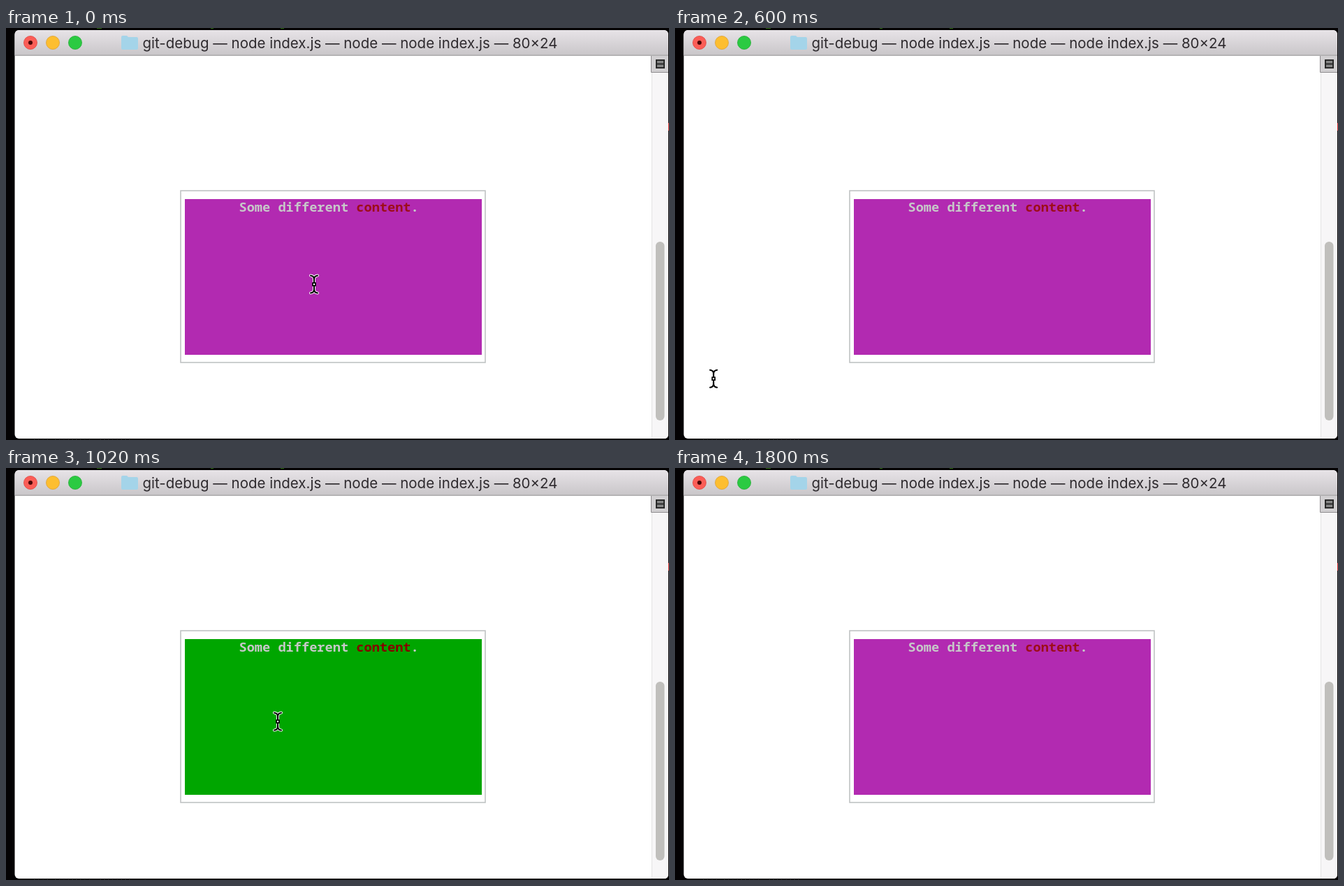
Animation, 949 px wide and 590 px high, one loop 1.86 s. Source, as an HTML page:

```html
<!DOCTYPE html>
<html lang="en">
<head>
<meta charset="utf-8">
<title>Terminal hover panel</title>
<style>
  html, body { margin: 0; width: 100%; height: 100%; overflow: hidden; background: #000; }
  svg { display: block; }
  .title { font: 20.5px Inter, Roboto, sans-serif; fill: #2e2a2e; text-anchor: middle; }
  .mono { font: 600 18.65px "Noto Sans Mono", "DejaVu Sans Mono", monospace; fill: #c7c8c9; white-space: pre; }
  .beam { fill: none; stroke-linecap: round; }
</style>
</head>
<body>
<svg width="949" height="590" viewBox="0 0 949 590">
  <defs>
    <linearGradient id="bar" x2="0" y2="1">
      <stop stop-color="#e7e3e7"/>
      <stop offset="1" stop-color="#c9c6c9"/>
    </linearGradient>
    <path id="beam" d="M-5-12.5Q0-12 0-7Q0-12 5-12.5M0-7V7M-5 12.5Q0 12 0 7Q0 12 5 12.5"/>
  </defs>

  <!-- desktop showing around the window -->
  <rect width="949" height="590" fill="#040203"/>
  <path d="M130 .5h7M293 .5h4M393 .5h5" stroke="#2c6a10"/>
  <path d="M40 589.5h22M70 589.5h52M134 589.5h44M198 589.5h4" stroke="#333" stroke-dasharray="2 4"/>

  <!-- window -->
  <rect x="12.5" y="3" width="935.5" height="585" rx="6" fill="#fff"/>
  <path d="M12.5 39V10q0-7 7-7H941q7 0 7 7V39z" fill="url(#bar)"/>
  <path d="M12.5 39.200H948" stroke="#8f8d8f"/>
  <path d="M948 136v11" stroke="#d02b2b" stroke-width="2"/>
  <circle cx="35" cy="21" r="9.500" fill="#fb5d57" stroke="#df4744" stroke-width=".8"/>
  <circle cx="35" cy="21" r="3" fill="#4a0505"/>
  <circle cx="67" cy="21" r="9.500" fill="#fdbe30" stroke="#dea032" stroke-width=".8"/>
  <circle cx="99" cy="21" r="9.500" fill="#2bca42" stroke="#24ad35" stroke-width=".8"/>
  <path d="M165 13q0-2 2-2h6l2 2h12q2 0 2 2V29q0 2-2 2H167q-2 0-2-2z" fill="#a4d4e9"/>
  <text class="title" x="492.5" y="28.500">git-debug — node index.js — node — node index.js — 80×24</text>

  <!-- scroll bar -->
  <path d="M924 64H948V582q0 6-6 6H924z" fill="#f7f6f7"/>
  <path d="M924.500 64V588" stroke="#e4e3e4"/>
  <rect x="923.500" y="40" width="24.500" height="23.500" fill="#d1cfd1"/>
  <path d="M923.500 40V63.500H948" fill="none" stroke="#8d8b8d"/>
  <path d="M931 46h11v11h-11zM931 51.500h11" fill="#858585" stroke="#292929" stroke-width="2"/>
  <rect x="930" y="306" width="12.500" height="256" rx="6.200" fill="#c0bfbc"/>

  <!-- panel -->
  <rect x="250" y="233" width="436" height="246" fill="#fff" stroke="#c0c3c4" stroke-width="1.600"/>
  <rect id="panel" x="256" y="245" width="425" height="223"/>
  <text class="mono" x="333.500" y="262.500">Some different <tspan id="word">content</tspan>.</text>

  <g id="cursor">
    <use href="#beam" class="beam" stroke="#fff" stroke-width="4"/>
    <use href="#beam" class="beam" stroke="#000" stroke-width="2.100"/>
    <rect x="-2.800" y="-2.800" width="5.600" height="5.600" fill="#000"/>
    <rect x="-1.100" y="-1.100" width="2.200" height="2.200" fill="#fff"/>
  </g>
</svg>
<script>
const STEP = 60, STEPS = 31, LAG = 1;
// Pointer path, sweeping in and out of the panel: step, x, y
const path = [
  [0, 441, 367], [1, 429, 403], [2, 422, 250], [3, 415, 26], [5, 402, 250],
  [6, 411, 370], [7, 350, 520], [8, 230, 576], [9, 72, 500], [11, 60, 499],
  [12, 75, 380], [14, 215, 18], [16, 350, 255], [17, 389, 363], [22, 275, 445],
  [23, 208, 504], [24, 120, 576], [25, 69, 400], [26, 150, 120], [27, 225, 18],
  [29, 460, 228]
];
const $ = id => document.getElementById(id);
const panel = $('panel'), word = $('word'), cursor = $('cursor');

// Catmull-Rom blend of four neighbouring values
const spline = (a, b, c, d, u) =>
  b + u / 2 * (c - a + u * (2 * a - 5 * b + 4 * c - d + u * (3 * (b - c) + d - a)));

// Position at a step, or null while the pointer is away
function pointer(step) {
  const last = path.length - 1;
  if (step < 0 || step > path[last][0]) return null;
  let i = 0;
  while (i < last - 1 && path[i + 1][0] <= step) i++;
  const near = [i - 1, i, i + 1, i + 2].map(k => path[Math.max(0, Math.min(last, k))]);
  const u = (step - near[1][0]) / (near[2][0] - near[1][0]);
  return [1, 2].map(axis => spline(...near.map(p => p[axis]), u));
}

const inPanel = p => p !== null && p[0] > 250 && p[0] < 686 && p[1] > 233 && p[1] < 479;

function draw(now) {
  const step = Math.floor(now / STEP) % STEPS;
  const at = pointer(step);
  // The terminal repaints a little after the pointer enters or leaves
  const hovered = inPanel(pointer(step - LAG));
  panel.setAttribute('fill', hovered ? '#00a600' : '#b22ab1');
  word.setAttribute('fill', hovered ? '#850000' : '#9d0d19');
  cursor.setAttribute('visibility', at ? 'visible' : 'hidden');
  if (at) cursor.setAttribute('transform', `translate(${at})`);
}

const start = performance.now();
function tick() {
  draw(performance.now() - start);
  requestAnimationFrame(tick);
}
tick();
</script>
</body>
</html>
```
